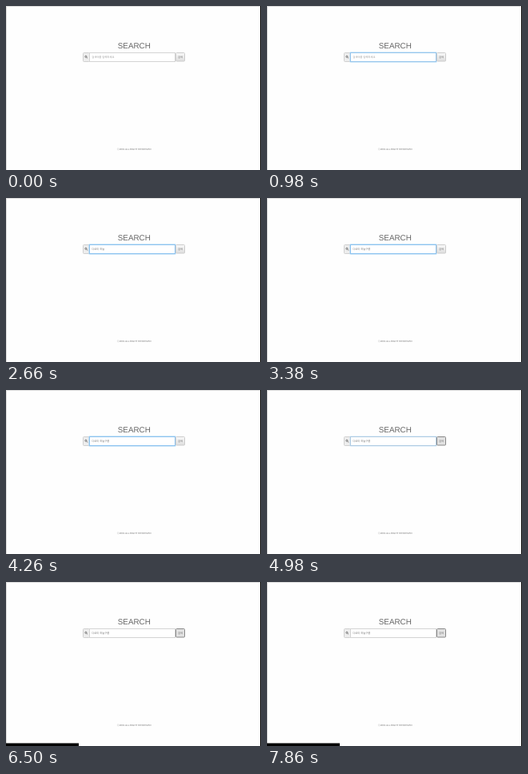
An HTML page that plays this animation: 319x205 px, repeating every 8000 ms.

```html
<!DOCTYPE html>
<html lang="ko">
<head>
<meta charset="utf-8">
<title>Search</title>
<style>
html, body { margin: 0; width: 100%; height: 100%; overflow: hidden; background: #fefefe; }
svg { display: block; }
text { font: 3.3px "Noto Sans CJK KR", "Noto Sans CJK", sans-serif; fill: #888; text-rendering: geometricPrecision; }
#title { font: 9.85px "Liberation Sans", Arial, sans-serif; fill: #666; }
#footer { font: 3px "Liberation Sans", Arial, sans-serif; fill: #777; }
</style>
</head>
<body>
<svg width="319" height="205" viewBox="0 0 319 205">
  <defs>
    <linearGradient id="shade" x2="0" y2="1">
      <stop stop-color="#fafafa"/><stop offset="1" stop-color="#dedede"/>
    </linearGradient>
  </defs>
  <path d="M0 .5H318M.5 0V205" stroke="#ddd"/>
  <path d="M318.5 0V205" stroke="#000"/>
  <text id="title" x="160.3" y="53" text-anchor="middle">SEARCH</text>

  <rect x="96.5" y="58.5" width="8" height="11" rx="1" fill="#eee" stroke="#d0d0d0"/>
  <g fill="none" stroke="#555" stroke-width=".7">
    <circle cx="99.9" cy="63.3" r="1.1"/><path d="M100.7 64.1L102 65.4"/>
  </g>

  <rect x="104.5" y="58.5" width="107" height="11" fill="#fff" stroke="#d4d4d4"/>
  <g id="focus" fill="none">
    <rect x="104" y="58" width="108" height="12" rx="1" stroke="#a9d5f5" stroke-width="2" opacity=".55"/>
    <rect x="104.5" y="58.5" width="107" height="11" stroke="#8cc3f0"/>
  </g>
  <text id="entry" x="107.2" y="65.1"></text>
  <path id="caret" d="M107.5 62.5V65.5" stroke="#888" stroke-width=".5"/>

  <rect id="button" x="212.5" y="58.5" width="11" height="10.5" rx="1" fill="url(#shade)" stroke="#ccc"/>
  <text x="218.1" y="65.1" text-anchor="middle" style="fill:#666">검색</text>

  <g id="menu">
    <rect x="104.5" y="69.5" width="107" height="25.8" fill="#fff" stroke="#eaeaea"/>
    <path d="M104 69.5H212" stroke="#8cc3f0"/>
    <text x="109" y="74.5">다로미</text>
    <text x="109" y="83.2">다로미 신발</text>
    <text x="109" y="91.9">다로미 구름신발 1</text>
  </g>

  <text id="footer" x="160.2" y="179.9" text-anchor="middle">ⓒ2001 ALL RIGHT RESERVED</text>
  <rect id="status" y="201.5" width="91" height="3.5" fill="#000"/>
</svg>
<script>
const LOOP = 8000;
const $ = id => document.getElementById(id);
const typing = [
  [0, "검색어를 입력하세요"], [1620, "다로"], [1860, "다롬"], [1940, "다로미"],
  [2580, "다로미 하"], [2660, "다로미 하늘"], [2820, "다로미 하늘ㄱ"],
  [3060, "다로미 하늘구"], [3220, "다로미 하늘구르"], [3380, "다로미 하늘구름"]
];
const clamp = v => Math.max(0, Math.min(1, v));
const show = (id, on) => $(id).setAttribute("visibility", on ? "visible" : "hidden");

function draw(t) {
  const [, text] = typing.findLast(([start]) => t >= start);
  $("entry").textContent = text;
  $("entry").style.fill = t < 1620 ? "#999" : "#777";

  // The focus glow fades in 80 ms steps.
  const fadeIn = t < 500 ? 0 : clamp((Math.floor((t - 500) / 80) + 1) / 8);
  const fadeOut = t < 4900 ? 0 : t < 5220 ? clamp((Math.floor((t - 4900) / 80) + 1) / 4) : 1;
  $("focus").setAttribute("opacity", fadeIn * (1 - fadeOut));

  show("caret", t >= 1220 && t < 1620);
  show("menu", t >= 1620 && t < 2580);
  show("status", t >= 5220);

  const pressed = t >= 4900;
  $("button").setAttribute("fill", pressed ? "#e2e2e2" : t >= 4740 ? "#e6e6e6" : "url(#shade)");
  $("button").setAttribute("stroke", pressed ? "#888" : "#ccc");
}

function tick(now) {
  draw(now % LOOP);
  requestAnimationFrame(tick);
}
draw(0);
requestAnimationFrame(tick);
</script>
</body>
</html>
```
